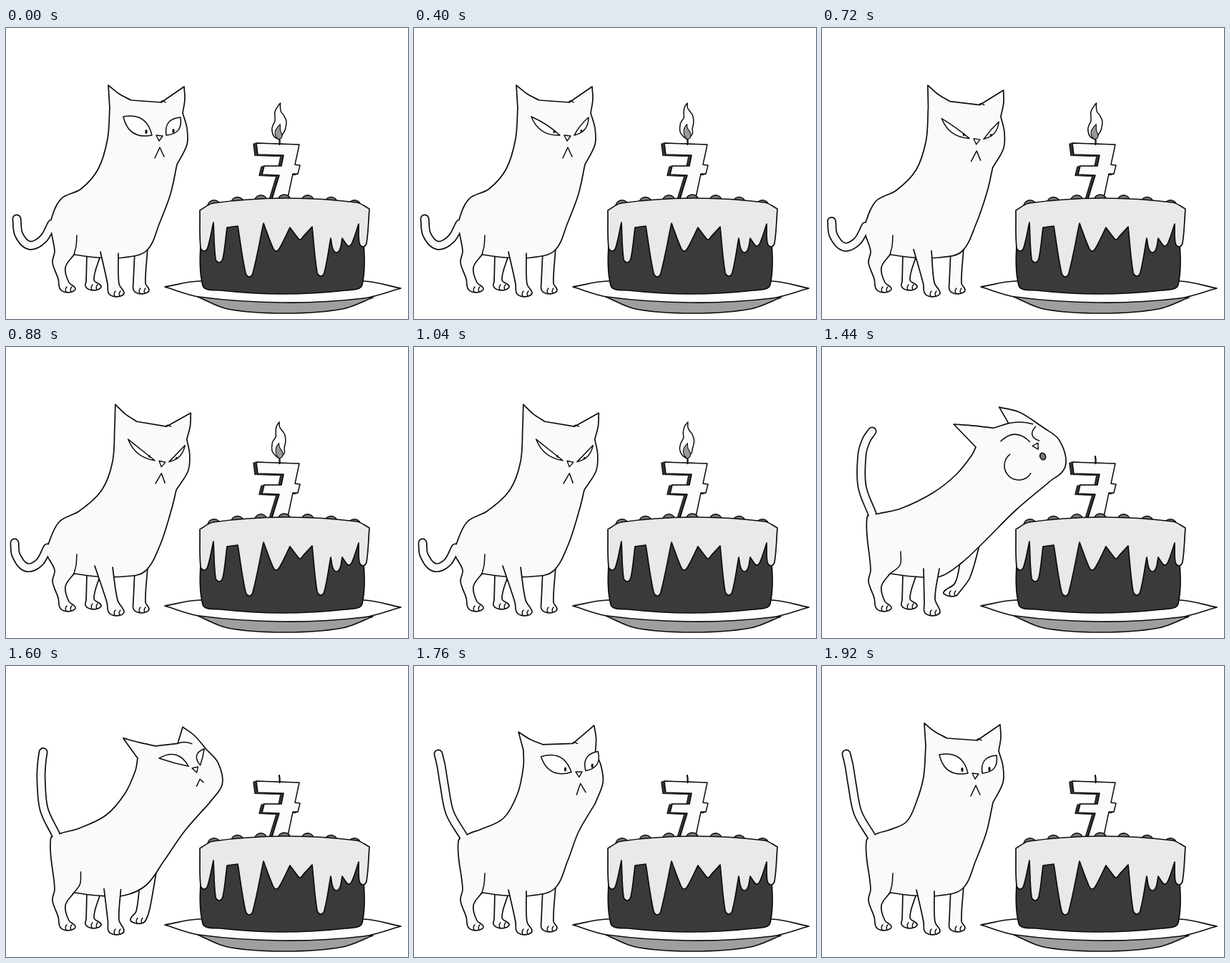
Animation of 562x407 px, one loop 2.41 s. Source, as an HTML page with a canvas:

```html
<!DOCTYPE html>
<html lang="en">
<head>
<meta charset="utf-8">
<title>Cat and cake</title>
<style>
  html, body { margin: 0; width: 100%; height: 100%; overflow: hidden; background: #fff; }
  canvas { display: block; }
</style>
</head>
<body>
<canvas id="stage" width="562" height="407"></canvas>
<script>
const ctx = document.getElementById('stage').getContext('2d');
const LOOP = 2410;
const INK = '#0c0c0c', FUR = '#fafafa';

// "x,y" points; "!" marks a sharp corner, kept as a third value.
const pts = text => text.split(' ').map(p => [...p.match(/[\d.]+/g).map(Number), +p.endsWith('!')]);
const mix = (a, b, k) => Array.isArray(a) ? a.map((v, i) => mix(v, b[i], k)) : a + (b - a) * k;
const smooth = k => k * k * (3 - 2 * k);

// Two views of the head: facing out and facing the candle.
const facing = {
  skull: pts('143,80! 158,92 175,101! 217,104! 249,82! 250,100 247,119! 253,140 253,163 239,191!'),
  eyes: pts('164,124 204,150 224,150 244,125'),
  nose: pts('210,150! 219,151! 214,158!'),
  mouth: pts('208,182! 215,167! 221,180!'),
  pivot: [200, 140]
};
const profile = {
  skull: pts('153,102! 185,105 216,109! 240,103! 226,80! 258,88 293,109! 320,129 328,166 300,188!'),
  eyes: pts('237,130 283,132 298,131 293,111'),
  nose: pts('287,138! 296,134! 296,143!'),
  mouth: pts('299,157! 303,153! 307,149!'),
  pivot: [265, 145]
};

// lids: bulge of the upper and lower lid; limbs: hip, ankle, paw, ankle, hip.
const sit = {
  view: 0, move: [0, 0], turn: 0, squash: 1, look: [0, 0], lids: [11.5, 11.5],
  neck: pts('230,232 215,272 197,311'),
  rump: pts('63,283 63,268'),
  back: pts('77,239 105,225 129,197 142,155 145,112!'),
  tail: pts('64,274 52,295 33,304 18,289 15,267'),
  nearLeg: pts('132,313 142,358 152,374 158,358 157,315'),
  farLeg: pts('180,312 178,356 187,370 195,357 198,308')
};
const frown = { ...sit, lids: [2, 8.5] };
const lean = {
  ...frown, move: [4, 5.4], turn: 0.094, look: [1, 3], lids: [0, 7],
  neck: pts('232,225 215,278 194,314'),
  rump: pts('57,290 58,279'),
  back: pts('74,245 103,229 134,200 149,160 152,110!'),
  tail: pts('58,281 46,302 28,308 14,291 12,274'),
  nearLeg: pts('124,306 141,357 152,374 156,354 149,308')
};
const blow = {
  ...sit, view: 1, lids: [10, -10],
  neck: pts('255,229 220,272 190,300'),
  rump: pts('61,245 85,230'),
  back: pts('112,225 155,205 181,179 198,148 205,135!'),
  tail: pts('72,236 47,221 32,237 26,268 14,291'),
  nearLeg: pts('142,310 143,358 152,374 158,352 164,310'),
  farLeg: pts('194,296 186,330 179,347 207,322 222,270')
};
const puff = {
  ...blow, move: [19, 3], turn: -0.03, squash: 0.88, look: [-9, -2],
  neck: pts('270,229 228,271 195,302'),
  rump: pts('63,238 79,233'),
  back: pts('110,226 155,204 188,178 209,152 215,140!'),
  tail: pts('70,233 56,195 56,150 62,130 70,118')
};
const rebound = {
  ...sit, move: [9, 6], turn: -0.104, look: [6, -7],
  rump: pts('62,245 78,234'),
  back: pts('92,229 125,213 145,178 153,140 153,118!'),
  tail: pts('69,238 50,205 42,165 38,140 34,123')
};
const rest = {
  ...sit, rump: rebound.rump, tail: rebound.tail,
  back: pts('92,230 118,218 132,190 142,155 145,112!')
};

const keys = [
  [0, sit], [160, sit], [400, frown], [560, frown], [880, lean], [1120, lean],
  [1280, blow], [1440, puff], [1760, rebound], [1920, rest], [LOOP, rest]
];

// Smooth curve through points, breaking at corners.
function curve(p, closed = true) {
  const path = new Path2D(), n = p.length;
  const at = i => closed ? p[(i + n) % n] : p[Math.max(0, Math.min(n - 1, i))];
  const handle = (a, from, to, len) => {
    const dx = to[0] - from[0], dy = to[1] - from[1], d = Math.hypot(dx, dy) || 1;
    return [a[0] + dx / d * len, a[1] + dy / d * len];
  };
  path.moveTo(p[0][0], p[0][1]);
  for (let i = 0; i < (closed ? n : n - 1); i++) {
    const a = at(i), b = at(i + 1);
    const len = Math.hypot(b[0] - a[0], b[1] - a[1]) / 3;
    const c = handle(a, a[2] > 0.4 ? a : at(i - 1), b, len);
    const d = handle(b, b[2] > 0.4 ? b : at(i + 2), a, len);
    path.bezierCurveTo(...c, ...d, b[0], b[1]);
  }
  if (closed) path.closePath();
  return path;
}

function paint(path, fill, width = 1.7, ink = INK) {
  if (fill) { ctx.fillStyle = fill; ctx.fill(path); }
  if (width) { ctx.strokeStyle = ink; ctx.lineWidth = width; ctx.stroke(path); }
}

function dot(x, y, rx, ry, fill, width, tilt = 0) {
  const path = new Path2D();
  path.ellipse(x, y, rx, ry, tilt, 0, 7);
  paint(path, fill, width);
}

function drawCandle() {
  const face = curve(pts('350,161! 410,163! 404,191! 411,192! 408,204! 401,204! 393,242! 371,242! 382,206! 358,205! 361,193! 385,193! 388,178! 352,177!'));
  for (let i = 4; i > 0; i--) {
    ctx.save();
    ctx.translate(-i, i * 0.3);
    paint(face, '#333', 1.5, i === 4 ? INK : '#333');
    ctx.restore();
  }
  paint(face, '#fbfbfb', 1.5);
  paint(new Path2D('M382 153q1 5 .5 10'), null, 2.2);
}

function drawBerries() {
  let seed = 7;
  const random = () => (seed = seed * 16807 % 2147483647) / 2147483647;
  for (let i = -3; i <= 3; i++) {
    const x = 389 + i * 32.7, y = 242 + i * i * 0.85;
    dot(x, y, 9, 9, '#777', 1.5);
    for (let j = 0; j < 10; j++) dot(x - 6 + random() * 12, y - 5 + random() * 5, 0.7, 0.7, '#a2a2a2', 0);
  }
}

// Every drip hangs from two corners and ends in a rounded tip.
function drawIcing() {
  const hem = pts('271,255! 277,312 290,272! 298,328 309,279! 324,277! 340,348 360,273! 378,312 397,279! 411,296 428,278! 440,347 454,294! 462,314 470,294! 479,305 493,274! 499,306 508,253!');
  const drips = hem.flatMap(p => p[2] ? [p] : [-5, 0, 5].map(d => [p[0] + d, p[1] - Math.abs(d), 0]));
  paint(curve([...drips, ...pts('490,244 390,238 290,245')]), '#e9e9e9');
}

function drawCake() {
  paint(curve(pts('268,376! 310,393 390,399 470,393 513,377!')), '#9f9f9f');
  paint(curve(pts('222,362! 270,354 500,354 552,364! 500,378 387,384 270,376')), '#fefefe');
  paint(curve(pts('274,262! 275,360 300,367 385,372 475,367 498,359 498,262!')), '#3a3a3a');
  drawCandle();
  drawBerries();
  drawIcing();
}

// A flame tapers along a spine that wavers upward or curls away when blown.
function flame(reach, width, phase, bend) {
  const spine = s => mix(
    [382 + 1.8 * Math.sin(11.3 * (s - 0.35) - phase) * Math.min(1, s * 6), 156 - 51 * s],
    [382 + 28 * Math.sin(Math.PI * s) + 8 * s, 157 - 26 * s ** 0.6], bend);
  const left = [], right = [];
  for (let i = 0; i <= 8; i++) {
    const s = i / 8, [x, y] = spine(s * reach), [u, v] = spine(s * reach + 0.01);
    const half = width * Math.sin(Math.PI * s ** 0.62) / Math.hypot(u - x, v - y);
    const edge = side => [x + side * (v - y) * half, y - side * (u - x) * half, +(i % 8 === 0)];
    left.push(edge(1));
    if (i % 8) right.unshift(edge(-1));
  }
  return curve([...left, ...right]);
}

function drawFlame(t) {
  if (t >= 1440) return;
  if (t < 1360) {
    const phase = t / 80 % 3 * 0.5;
    const bend = t < 1200 ? 0 : t < 1280 ? 0.5 : 1;
    const width = 9 - 4.5 * bend;
    paint(flame(1, width, phase, bend), '#fdfdfd', 1.5);
    paint(flame(0.42, width / 2, phase, bend), '#999', 1.1);
  }
  if (t >= 1280) {
    ctx.save();
    if (t >= 1360) ctx.translate(14, -4);
    paint(curve(pts('375,125! 390,122 405,126! 390,128')), '#fdfdfd', 1.3);
    ctx.restore();
  }
}

const paw = ([x, y]) => [[x - 9, y - 4], [x - 3, y + 1], [x + 8, y + 1], [x + 13, y - 4]];

function toes([x, y]) {
  paint(new Path2D(`M${x} ${y + 1}q-2-4 1-7m6 7q-2-4 1-7`), null, 1.4);
}

function limb([hip, ankle, foot, heel, seat]) {
  paint(curve([hip, ankle, ...paw(foot), heel, seat], false), FUR);
  toes(foot);
}

function eye(a, b, [top, bottom]) {
  const dx = b[0] - a[0], dy = b[1] - a[1], d = Math.hypot(dx, dy);
  const control = bulge => [(a[0] + b[0]) / 2 + dy / d * bulge * 2, (a[1] + b[1]) / 2 - dx / d * bulge * 2];
  const path = new Path2D();
  path.moveTo(a[0], a[1]);
  path.quadraticCurveTo(...control(top), b[0], b[1]);
  path.quadraticCurveTo(...control(-bottom), a[0], a[1]);
  paint(path, '#fff', 1.5);
}

function poseAt(t) {
  const next = keys.findIndex(k => k[0] > t);
  const [t0, a] = keys[next - 1], [t1, b] = keys[next];
  const k = smooth((t - t0) / (t1 - t0));
  return Object.fromEntries(Object.keys(sit).map(name => [name, mix(a[name], b[name], k)]));
}

// Places head points on the stage; the face can slide across the skull.
function placer({ move, turn, squash, look }, [px, py]) {
  const c = Math.cos(turn), s = Math.sin(turn);
  return (points, slide = 0) => points.map(([x, y, sharp]) => {
    const u = (x - px) * squash, v = y - py;
    return [
      px + u * c - v * s + move[0] + look[0] * slide,
      py + u * s + v * c + move[1] + look[1] * slide, sharp
    ];
  });
}

function drawFace(pose, head, place) {
  const [a, b, c, d] = place(head.eyes, 1);
  eye(a, b, pose.lids);
  eye(c, d, pose.lids.map(v => v * 0.75));
  if (pose.view < 0.3) {
    const open = Math.min(3, 1.8 + pose.lids[0] / 9);
    for (const [x, y] of place(pts('196,145 234,144'), 1)) dot(x, y, 1.6, open, INK, 0);
  }
  paint(curve(place(head.nose, 1)), '#fff', 1.4);
  const mouth = place(head.mouth, 1);
  if (pose.view > 0.6) dot(mouth[1][0], mouth[1][1], 3.8, 5, '#777', 1.5, -0.4);
  else paint(curve(mouth, false), null, 1.5);
}

function drawCat(t) {
  const pose = poseAt(t), { view } = pose;
  const head = Object.fromEntries(Object.keys(facing).map(name => [name, mix(facing[name], profile[name], view)]));
  const place = placer(pose, head.pivot);
  const skull = place(head.skull);
  const hindPaw = [84, 368];
  const hind = [
    ...pts('165,321 128,321 95,317! 83,335 88,356'), ...paw(hindPaw).reverse(), ...pts('73,351 65,328 68,312')
  ];
  const tail = curve(pose.tail, false);

  limb(pts('113,315 112,354 120,365 123,352 132,318'));
  limb(pose.farLeg);
  paint(tail, null, 13);
  paint(curve([...skull, ...pose.neck, ...hind, ...pose.rump, ...pose.back]), FUR);
  paint(tail, null, 9.6, FUR);
  limb(pose.nearLeg);
  toes(hindPaw);

  const thigh = 99 + 11 * view;
  paint(curve([[thigh, 290 - 4 * view], [thigh - 1, 305], [95, 317]], false), null, 1.5);
  const [x, y] = skull[3];
  paint(new Path2D(`M${x} ${y}q${18 * view}-4 ${6 + 28 * view} ${view}`), null, 1.5);

  drawFace(pose, head, place);
  if (t === 1440) {
    const cheek = new Path2D();
    cheek.arc(275, 166, 20, -2.23, 0.56, true);
    paint(cheek, null, 1.5);
  }
}

function draw(t) {
  ctx.fillStyle = '#fff';
  ctx.fillRect(0, 0, 562, 407);
  drawCake();
  drawFlame(t);
  drawCat(t);
}

// Poses advance every 80 ms, with two longer holds.
function stepTime(t) {
  if (t >= 1920) return 1920;
  if (t >= 1440 && t < 1600) return 1440;
  return Math.floor(t / 80) * 80;
}

ctx.lineJoin = ctx.lineCap = 'round';
const start = performance.now();
let shown = -1;
function tick() {
  const t = stepTime((performance.now() - start) % LOOP);
  if (t !== shown) draw(shown = t);
  requestAnimationFrame(tick);
}
tick();
</script>
</body>
</html>
```
